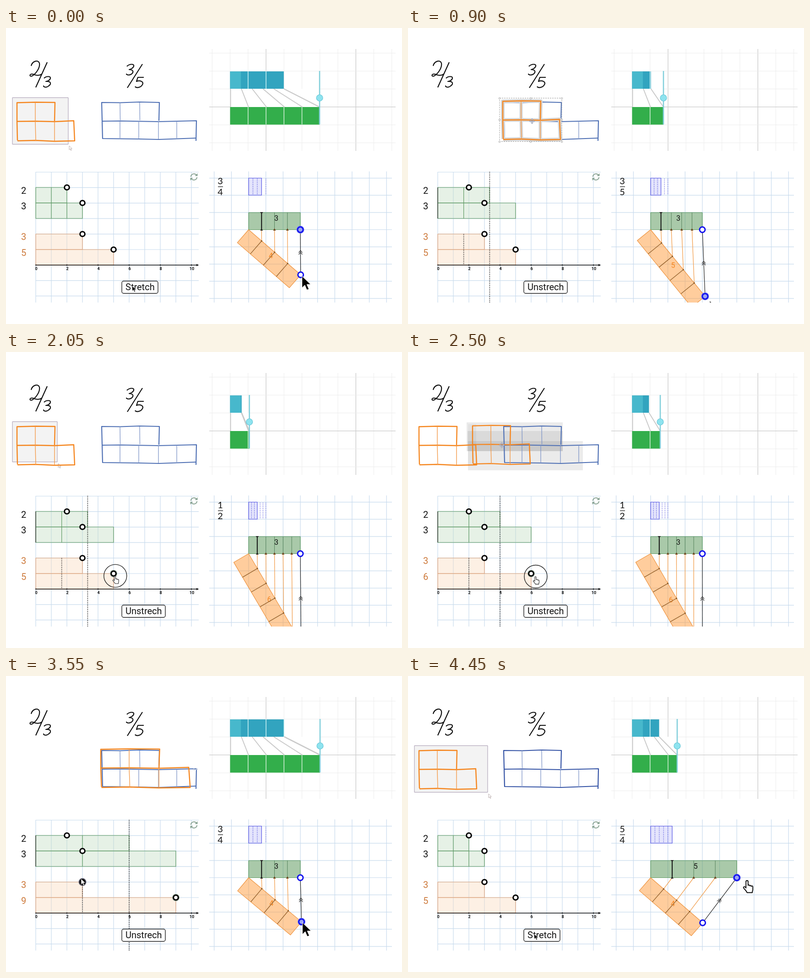
Recreate the animation shown at these times as an HTML page with a canvas. Size 865 px wide and 648 px high, loop 4500 ms.

```html
<!DOCTYPE html>
<html>
<head>
<meta charset="utf-8">
<style>
html, body { margin: 0; width: 100%; height: 100%; overflow: hidden; background: #fff }
canvas { display: block }
</style>
</head>
<body>
<canvas id="stage" width="865" height="648"></canvas>
<script>
const g = document.getElementById('stage').getContext('2d');
const LOOP = 4500, STEP = 50;
const HAND = 'M0 0Q2-2 4 0V8Q6 6 7 9Q9 7 10 10Q13 8 13 11V17Q12 19 12 22H2Q1 19-3 15Q-6 12-4 11Q-2 10 0 13Z';
const ARROW = 'M0 0V17L4 13L7 20L10 19L7 12H12.5Z';

// Piecewise linear value: keys are [time, value] pairs.
function at(t, ...keys) {
  if (t <= keys[0][0]) return keys[0][1];
  for (let i = 1; i < keys.length; i++) {
    const [t0, a] = keys[i - 1], [t1, b] = keys[i];
    if (t < t1) return a + (b - a) * (t - t0) / (t1 - t0);
  }
  return keys[keys.length - 1][1];
}
function line(color, width, ...p) {
  g.beginPath();
  for (let i = 0; i < p.length; i += 2) g.lineTo(p[i], p[i + 1]);
  g.strokeStyle = color; g.lineWidth = width; g.stroke();
}
function dotted(color, width, ...p) {
  g.setLineDash([1.5, 2.5]); line(color, width, ...p); g.setLineDash([]);
}
function box(x, y, w, h, fill, stroke, width = 1.2) {
  if (fill) { g.fillStyle = fill; g.fillRect(x, y, w, h); }
  if (stroke) { g.strokeStyle = stroke; g.lineWidth = width; g.strokeRect(x, y, w, h); }
}
function ring(x, y, r, fill, stroke, width) {
  g.beginPath(); g.arc(x, y, r, 0, 7);
  if (fill) { g.fillStyle = fill; g.fill(); }
  if (stroke) { g.strokeStyle = stroke; g.lineWidth = width; g.stroke(); }
}
function text(s, x, y, size, color = '#111', align = 'center', font = 'Roboto') {
  g.font = `${size}px ${font}, sans-serif`;
  g.fillStyle = color; g.textAlign = align; g.fillText(s, x, y);
}
function shape(d, x, y, scale, fill, stroke, width = 1) {
  g.save(); g.translate(x, y); g.scale(scale, scale);
  const p = new Path2D(d);
  if (fill) { g.fillStyle = fill; g.fill(p); }
  if (stroke) { g.strokeStyle = stroke; g.lineWidth = width; g.stroke(p); }
  g.restore();
}
function clip(x, y, w, h, draw) {
  g.save(); g.beginPath(); g.rect(x, y, w, h); g.clip(); draw(); g.restore();
}

// Hand-drawn fractions
function orange(dx, dy, s, glow) {
  const X = x => 24 + dx + (x - 24) * s;
  const path = (c, w, ...p) => line(c, w, ...p.map((v, i) => i % 2 ? v + dy : X(v)));
  const outline = (c, w) => {
    path(c, w, 106, 204, 107, 163, 65, 162.5, 24, 163.5, 24, 204, 25, 246);
    path(c, w, 24, 204.5, 65, 204, 106, 205, 148, 203, 150, 247, 106, 248, 64, 246, 25, 247);
  };
  const bars = (c, w) => {
    path(c, w, 64, 163, 64, 204, 65, 247);
    path(c, w, 106, 204, 106, 247);
  };
  if (glow) { outline('#d6d6d6', 8); bars('#d6d6d6', 7); }
  outline('#f5861f', 2.4);
  bars('#f39a4a', 1.4);
}
function sketch(t) {
  shape('M55 83C57 73 70 68 73 77C75 86 66 100 57 105C53 107 50 103 55 101C60 99 67 108 78 101' +
    'M90 75L65 130M83 110C88 105 98 105 97 110C96 115 89 117 87 117C98 116 100 122 93 127C88 131 82 130 82 126' +
    'M264 84C270 78 281 78 279 84C277 89 270 91 269 91C279 91 279 97 274 101C269 104 263 103 263 100' +
    'M298 79L265 131M301 108H288L285 117C292 114 302 117 298 124C294 131 284 132 282 128', 0, 0, 1, null, '#111', 2.2);

  const second = t >= 1850 && t < 4050;
  const u = t < 1850 ? t : second ? t - 1750 : t - 4050;
  const sel = t < 600 ? at(t, [0, 122], [200, 160])
    : t >= 1900 && t < 2300 ? at(t, [1900, 5], [2150, 160])
    : t >= 4100 ? at(t, [4100, 5], [4350, 160]) : 0;
  const dx = second ? at(t, [2300, 0], [2500, 117], [2900, 190], [2950, 183])
    : t < 1850 ? at(t, [600, 0], [850, 183]) : 0;
  const s = second ? at(t, [3000, 1], [3450, 1.55])
    : t < 1850 ? at(t, [1000, 1], [1450, 1.6]) : 1;
  const dragging = second ? t >= 2300 && t < 2950 : t >= 600 && t < 850;
  const held = second ? t >= 2950 && t < 3000 : t >= 850 && t < 1000;

  if (sel) {
    const h = Math.min(102, sel * .9);
    box(14, 152.5, sel, h, '#f3f3f3', '#a497ae', 1);
    shape(ARROW, 16 + sel, 156 + h, .5, '#fff', '#aa9a9a', 1.5);
  }
  if (dragging) clip(0, 0, 434, 300, () => {
    const x = dx - 117, y = -5 * at(dx, [117, 0], [190, 1]);
    box(128 + x, 154 + y, 210, 63, 'rgba(0,0,0,.08)');
    box(130 + x, 173 + y, 208, 44, 'rgba(0,0,0,.07)');
    box(131 + x, 195 + y, 251, 64, 'rgba(0,0,0,.08)');
    box(131 + x, 158 + y, 18, 92, 'rgba(0,0,0,.04)');
  });

  const blue = sel && t > 4000 ? '#3453a5' : '#4f70b4';
  line(blue, 2.2, 210, 203, 209, 163, 250, 163.5, 292, 162, 335, 163, 334, 203);
  line(blue, 2.2, 209, 204, 250, 203.5, 333, 205, 416, 203, 415, 247);
  line(blue, 2.2, 210, 204, 211, 242, 290, 243, 334, 244, 415, 241);
  for (const [x, y] of [[249, 163], [292, 163], [249, 204], [290, 204], [333, 204], [373, 204]])
    line('#7f95c7', 1.3, x, y, x + (y > 200 ? 0 : .5), y + 39);

  if (dragging) orange(0, 0, 1);
  const dy = -3 * Math.min(1, dx / 183);
  orange(dx, dy, s, held);
  const mid = 90 + dx;
  if (held) {
    g.setLineDash([3, 2]);
    box(dx + 17, 153.5, 136, 95, null, '#999', 1);
    g.setLineDash([]);
    for (const x of [0, 68, 136]) for (const y of [154, 201, 249])
      if (x !== 68 || y !== 201) ring(dx + 17 + x, y, 1.8, '#fff', '#999', .8);
  }
  if (held || dragging)
    shape('M0-6L2-3H-2ZM0 6L2 3H-2ZM-6 0L-3-2V2ZM6 0L3-2V2ZM-3 0H3M0-3V3', mid - 2, 204, 1, '#fff', '#8a94b0', 1);
  else if (s > 1)
    shape('M-5 0L-2-2V2ZM5 0L2-2V2ZM-2 0H2', 35 + dx + 126 * s, 204, 1, '#fff', '#8a9cc4', .9);
}

// Two proportional bars with a slider
function bars(t) {
  const U = 39.25, X0 = 489.5;
  const x = at(t, [0, 685], [450, 630], [900, 558], [1550, 531], [2000, 529.5], [2500, 551],
    [2900, 597], [3550, 686], [3750, 686], [4450, 588]);
  const len = x - X0;
  for (let i = -1; i < 10; i++) {
    const main = i === 2 || i === 7;
    line(main ? '#d2d2d2' : '#ececec', main ? 1.6 : 1, X0 + i * U, 46, X0 + i * U, 269);
  }
  for (let i = 0; i < 6; i++)
    line(i === 3 ? '#d2d2d2' : '#ececec', i === 3 ? 1.5 : 1, 444, 55 + i * U, 851, 55 + i * U);
  box(X0, 133, len, 40, '#fff');
  for (let k = 0; k * U < len; k++)
    line('#c9c9c9', 2, X0 + k * U * .6 + 1, 133, X0 + k * U + 1, 173);
  line('#c9c9c9', 2, X0 + len * .6, 133, x, 173);
  box(X0, 95, len * .6, 38, '#32a4bf');
  box(X0, 95, Math.min(len * .6, U * .6), 38, '#47b8cc');
  box(X0, 173, len, 38.5, '#33ae4b');
  for (let k = 1; k * U < len; k++) {
    const sx = X0 + k * U;
    line('#d6f0d9', 1.5, sx, 173, sx, 211);
    if (k * U < len * .6) line('#c9f0f4', 1.6, sx, 95, sx, 133);
  }
  line('#83cfdb', 2.6, x, 94, x, 211);
  ring(x, 153, 7, '#8ee3ef', '#66c6d6', 1.2);
}

// Stretchable rows on a number line
function stretch(t) {
  const U = 34, X = v => 65 + v * U;
  const live = t < 4100;
  const amount = live ? at(t, [500, 0], [750, 1]) : 0;
  const px = at(t, [1050, 235], [1350, 203], [1650, 203], [2500, 279], [2900, 341], [3250, 350], [3350, 371]);
  const n = live ? Math.round((px - 65) / U) : 5;
  const s = 1 + (n / 3 - 1) * amount;
  const on = live && amount > 0;

  for (let i = 0; i < 11; i++) line('#c8dbed', 1.2, X(i), 315, X(i), 601);
  for (let i = 0; i < 9; i++) line('#c8dbed', 1.2, 65, 315.5 + i * 33.9, 421, 315.5 + i * 33.9);
  const green = 'rgba(190,218,190,.38)', edge = '#5f9a62';
  box(65, 349, 2 * s * U, 34, green, edge);
  box(65, 383, 3 * s * U, 34, green, edge);
  line(edge, 1.2, X(s), 349, X(s), 417);
  if (!on) line(edge, 1.2, X(2), 383, X(2), 417);
  box(65, 451, 3 * U, 34, 'rgba(250,215,185,.38)', '#dfa67f');
  box(65, 485, n * U, 34, 'rgba(250,215,185,.38)', '#dfa67f');

  line('#111', 1.4, 65, 519, 420, 519);
  shape('M0 0L-5-2.5V2.5Z', 421, 519, 1, '#111');
  for (let i = 0; i <= 10; i += 2) {
    line('#111', 1, X(i), 517, X(i), 521);
    text(i, X(i) + 1, 530, 'bold 9');
  }
  if (on) {
    line('#333', 1.3, 65, 349, 65, 417);
    dotted('#111', 1.6, X(s), 451, X(s), 519);
    dotted('#111', 1.8, X(2 * s), 315, X(2 * s), 601);
  }
  text(2, 38.5, 363, 20);
  text(3, 38.5, 397, 20);
  text(3, 38.5, 464, 20, '#cd7a3c');
  text(n, 38.5, 498.5, 20, '#cd7a3c');

  const drag = t >= 1100 && t < 3400;
  const done = t >= 3400 && live;
  if (drag || done) ring(X(n), 485, 8, '#9db0a0');
  if (done) ring(X(3), 451, 8.5, '#667');
  for (const [v, y] of [[2, 349], [3, 383], [3, 451], [n, 485]])
    ring(X(v), y, 5.3, '#fff', '#000', 3.1);

  box(253, 554, on ? 95 : 79, 27, '#fff');
  g.beginPath(); g.roundRect(253, 554, on ? 95 : 79, 27, 4);
  g.strokeStyle = '#222'; g.lineWidth = 1.4; g.stroke();
  text(on ? 'Unstrech' : 'Stretch', 261, 574, 20, '#111', 'left');

  if (drag) {
    const y = at(t, [1550, 488.5], [2500, 491.5], [2900, 494]);
    ring(px, y, 25, null, '#222', 1.4);
    shape(HAND, px - 2, y + 1, .72, '#fff', '#222', 1.5);
  } else if (done) {
    ring(X(3), 451, 6, '#111');
    shape(ARROW, at(t, [3400, 330], [3500, 164]), at(t, [3400, 480], [3500, 444]), .75, '#fff', '#333', 1.2);
  } else if (t < 750 || !live) {
    shape(ARROW, 276, 565, .65, '#111', '#fff', 1);
  }

  g.beginPath(); g.arc(410.5, 326, 6.8, 3.2, 5.7);
  g.strokeStyle = '#8ba596'; g.lineWidth = 2; g.stroke();
  g.beginPath(); g.arc(410.5, 326, 6.8, .1, 2.6); g.stroke();
  shape('M0 0V-6L-6 0Z', 418.5, 324, 1, '#8ba596');
  shape('M0 0V6L6 0Z', 402.5, 328, 1, '#8ba596');
}

// Division by parallel lines
function divide(t) {
  const U = 37.65, X0 = 530, Y0 = 441.5;
  const n = t < 500 ? 4 : t < 1200 ? 5 : t < 3150 ? 6 : t < 3350 ? 5 : 4;
  const a = t < 4050 ? 3 : t < 4200 ? 4 : 5;
  const ang = at(t, [0, 41], [300, 43], [900, 50.8], [1550, 55.2], [2100, 59.95], [2950, 59.95],
    [3250, 50], [3550, 39.9], [3750, 41]) * Math.PI / 180;
  const c = Math.cos(ang) * U, s = Math.sin(ang) * U;
  const end = X0 + a * U, P = [X0 + n * c, Y0 + n * s], part = a / n * U;

  for (let i = -2; i < 9; i++) line('#c8dbed', 1.2, X0 + i * U, 314, X0 + i * U, 601);
  for (let i = -3; i < 5; i++) line('#c8dbed', 1.2, 444, Y0 + i * U, 843, Y0 + i * U);

  const d = n === a ? a : n % 3 === 0 && a === 3 ? 3 : 1;
  const frac = (v, y) => text(v, 468, y, 20, '#111', 'center', 'Lato');
  if (n === d) frac(a / d, 354);
  else {
    frac(a / d, 342);
    line('#111', 1.2, 463, 347.5, 474, 347.5);
    frac(n / d, 366);
  }
  box(X0, 328.5, part, 37.5, 'rgba(120,120,240,.2)', '#5555e5');
  for (let k = 1; k <= Math.max(n, a); k++)
    if (k !== a) dotted('#3a3ad8', 1.2, X0 + k * U / n, 330, X0 + k * U / n, 366);

  box(X0, 404, a * U, 37.5, 'rgba(84,147,84,.5)', '#5f9a62');
  for (let k = 1; k < n; k++)
    line(k > 1 ? '#55805a' : '#111', k > 1 ? 1 : 2, X0 + k * part, 404, X0 + k * part, 441);
  shape('M-3.5 0H3.5L0 4Z', X0 + part, 403, 1, '#222');

  g.beginPath();
  g.moveTo(X0, Y0); g.lineTo(...P); g.lineTo(P[0] - s, P[1] + c); g.lineTo(X0 - s, Y0 + c); g.closePath();
  g.fillStyle = 'rgba(255,150,50,.48)'; g.fill();
  g.strokeStyle = '#ee9440'; g.lineWidth = 1.2; g.stroke();
  text(n, X0 + (n * c - s) / 2 + 4, Y0 + (n * s + c) / 2 - 1, 16, '#f5861f');
  for (let k = 1; k < n; k++) {
    const x = X0 + k * c, y = Y0 + k * s, gx = X0 + k * part;
    line('#f2a050', 1.3, x, y, gx, Y0);
    line('#96622e', 1.4, x, y, x - s, y + c);
    ring(x, y, 1.6, '#8a5a28');
    shape('M-3 1H3L0-4Z', gx, Y0 + 1, 1, k > 1 ? '#6d431f' : '#222');
  }
  text(a, (X0 + end) / 2 + 4, 422, 16);

  line('#333', 1.3, ...P, end, Y0);
  g.save();
  g.translate((P[0] + end) / 2, (P[1] + Y0) / 2);
  g.rotate(Math.atan2(end - P[0], P[1] - Y0));
  line('#333', 1.2, -4, 1, 0, -4, 4, 1);
  line('#333', 1.2, -4, 5, 0, 0, 4, 5);
  g.restore();

  const top = t < 50 || t >= 3950, low = t >= 50 && t < 1400 || t >= 3000 && t < 3800;
  for (const [x, y, active] of [[end, Y0, top], [...P, low]]) {
    if (active) ring(x, y, 8.5, '#7d83ef');
    ring(x, y, 6, active ? '#9aa4f4' : '#fff', '#1414ee', 3);
  }
  if (t >= 3950) shape(HAND, end + 20, 449, 1.15, '#fff', '#111', 1.7);
  else {
    const off = at(t, [500, 3], [900, 10], [3000, 10], [3400, 2]);
    shape(ARROW, P[0] + off, P[1] + off, 1.5, '#000', '#fff', .6);
  }
}

function frame(now) {
  const t = Math.floor(now % LOOP / STEP) * STEP;
  g.fillStyle = '#fff';
  g.fillRect(0, 0, 865, 648);
  g.lineJoin = 'round';
  sketch(t);
  clip(444, 46, 407, 223, () => bars(t));
  stretch(t);
  clip(444, 314, 399, 287, () => divide(t));
}
const start = performance.now();
function tick() {
  frame(performance.now() - start);
  requestAnimationFrame(tick);
}
tick();
</script>
</body>
</html>
```
